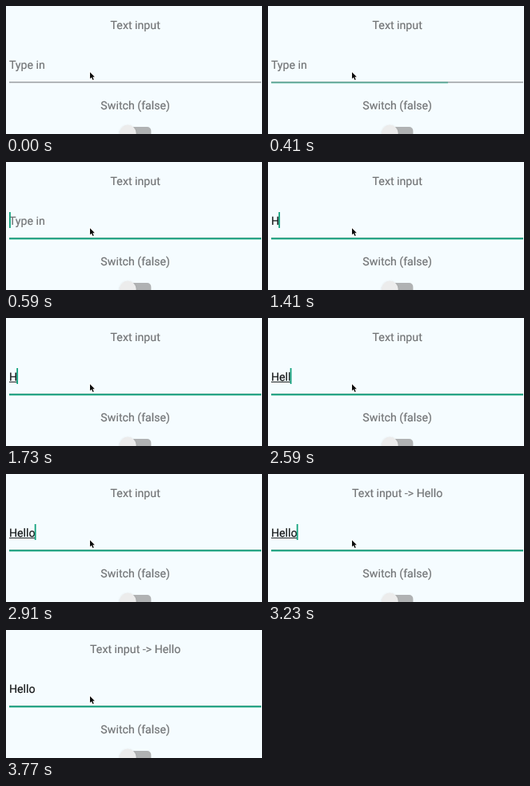
Write an HTML page that moves like this. It is 320 by 161 pixels and loops after 4280 ms.

```html
<!DOCTYPE html>
<html lang="en">
<head>
<meta charset="utf-8">
<title>Text input</title>
<style>
  html, body { margin: 0; width: 100%; height: 100%; overflow: hidden; background: #f5fcff; }
  svg { display: block; width: 320px; height: 161px; }
  text {
    font: 14.2px Roboto, sans-serif; fill: #727476; stroke: #727476; stroke-width: .2px;
    text-rendering: geometricPrecision;
  }
  .label { text-anchor: middle; }
  .accent { fill: #12a27e; }
  #typed { fill: #141617; stroke: #141617; }
</style>
</head>
<body>
<svg viewBox="0 0 320 161">
  <defs>
    <filter id="shadow" x="-30%" y="-30%" width="160%" height="160%">
      <feDropShadow dx="0" dy="0.8" stdDeviation="0.8" flood-opacity="0.2"/>
    </filter>
  </defs>
  <rect width="320" height="161" fill="#f5fcff"/>
  <text id="title" class="label" x="161.7" y="29"></text>

  <text id="hint" x="3.9" y="78.6">Type in</text>
  <text id="typed" x="3.9" y="78.6"></text>
  <rect id="composing" x="4" y="80" height="1" fill="#222425"/>
  <rect id="caret" class="accent" y="63" width="1.8" height="20"/>
  <rect x="4" y="95.4" width="315" height="1.1" fill="#7b7e80"/>
  <rect id="ripple" class="accent" y="95.4" height="2"/>

  <text class="label" x="161.7" y="129.6">Switch (false)</text>
  <rect x="144" y="152" width="37.4" height="15" rx="5" fill="#b0b2b3"/>
  <circle cx="152.3" cy="160" r="10.4" fill="#ececec" filter="url(#shadow)"/>

  <path d="M105 83.2v8.2l1.9-1.7 1.5 3.4 1.4-.6-1.5-3.3h2.6z"
        fill="#0b0b0b" stroke="#fff" stroke-width="1.5" paint-order="stroke"/>
</svg>
<script>
const LOOP = 4280;
const LEFT = 4, RIGHT = 319, TOUCH_X = 105;

// Each row: start time in ms, value from then on.
const TYPED = [[0, ''], [1320, 'H'], [1780, 'He'], [2230, 'Hel'], [2500, 'Hell'], [2730, 'Hello']];
const TITLE = [[0, 'Text input'], [3230, 'Text input -> Hello']];
const CARET = [[0, false], [500, true], [1000, false], [1320, true], [3770, false]];
const COMPOSING = [[0, false], [1450, true], [3320, false]];

const el = id => document.getElementById(id);
const [title, hint, typed, composing, caret, ripple] =
  ['title', 'hint', 'typed', 'composing', 'caret', 'ripple'].map(el);

const valueAt = (steps, t) => steps.findLast(([start]) => start <= t)[1];
const show = (node, on) => node.setAttribute('visibility', on ? 'visible' : 'hidden');
const setText = (node, text) => { if (node.textContent !== text) node.textContent = text; };

function drawRipple(t) {
  const p = Math.min(1, Math.max(0, (t - 320) / 270));
  const reach = (RIGHT - TOUCH_X) * (1 - (1 - p) ** 2);
  const from = Math.max(LEFT, TOUCH_X - reach);
  ripple.setAttribute('x', from);
  ripple.setAttribute('width', Math.min(RIGHT, TOUCH_X + reach) - from);
  ripple.setAttribute('opacity', Math.min(1, p * 1.5));
}

function render(t) {
  const text = valueAt(TYPED, t);
  setText(title, valueAt(TITLE, t));
  setText(typed, text);
  show(hint, !text);

  const width = text ? typed.getComputedTextLength() : 0;
  caret.setAttribute('x', Math.max(LEFT, LEFT + width - 0.9));
  show(caret, valueAt(CARET, t));
  composing.setAttribute('width', width);
  show(composing, valueAt(COMPOSING, t));
  drawRipple(t);
}

const begin = performance.now();
function tick() {
  render((performance.now() - begin) % LOOP);
  requestAnimationFrame(tick);
}
tick();
</script>
</body>
</html>
```
